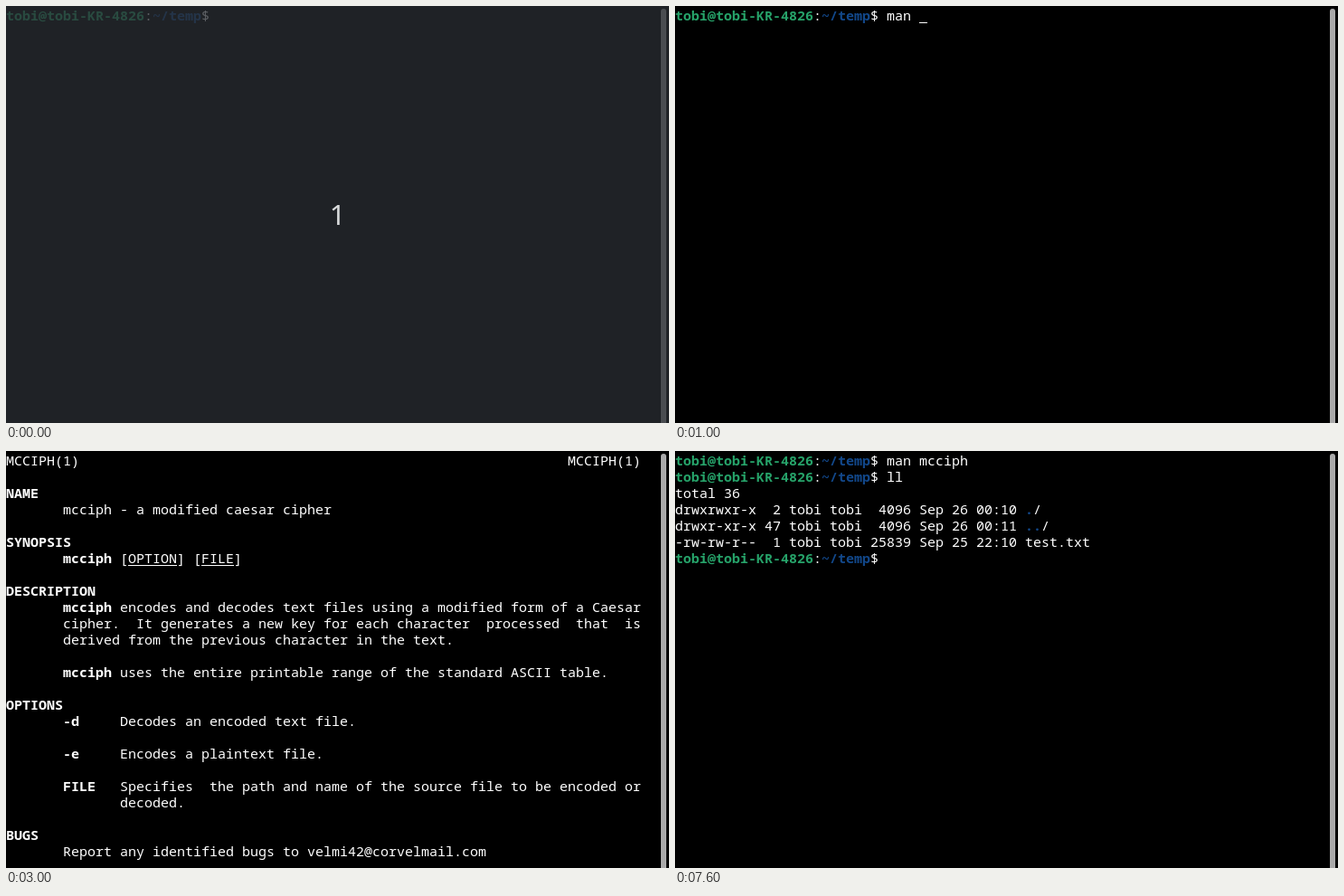
Recreate the animation shown at these times as an HTML page. Size 733 by 461 pixels, loop 8 s.

```html
<!DOCTYPE html>
<html lang="en">
<head>
<meta charset="utf-8">
<title>Terminal</title>
<style>
html, body { margin: 0; width: 100%; height: 100%; overflow: hidden; background: #000; }
#stage { position: relative; width: 733px; height: 461px; overflow: hidden; }
#stage > * { position: absolute; }
pre { left: 0; top: 1px; margin: 0; color: #fff; font: 15px/18px "Noto Sans Mono", monospace; }
u { text-decoration-thickness: 1px; text-underline-offset: 2px; text-decoration-skip-ink: none; }
.user { color: #26a269; }
.path { color: #12488b; }
#cursor { width: 9px; height: 1px; background: #fff; }
#bar { left: 724px; top: 3px; width: 6px; height: 460px; border-radius: 3px; background: #aaa; }
#count { inset: 0; background: rgba(42, 46, 51, .75); color: #d8dadb; text-align: center;
  font: 31px/461px "Noto Sans", sans-serif; }
</style>
</head>
<body>
<div id="stage">
  <pre id="screen"></pre>
  <div id="cursor"></div>
  <div id="bar"></div>
  <div id="count">1</div>
</div>
<script>
const [screen, cursor, count] = ['screen', 'cursor', 'count'].map(id => document.getElementById(id));
const LOOP = 8000, CELL = 9, ROW = 18, PROMPT_COLS = 26;

const prompt = '<b class="user">tobi@tobi-KR-4826</b>:<b class="path">~/temp</b>$ ';
const first = { text: 'man mcciph', keys: [500, 600, 800, 1000, 1500, 1600, 1800, 1900, 2000, 2600] };
const second = { text: 'll', keys: [6700, 6900] };
const cursorOn = [[500, 3000], [5800, 6300], [6600, 7600]];

const listing = `total 36
drwxrwxr-x  2 tobi tobi  4096 Sep 26 00:10 <b class="path">.</b>/
drwxr-xr-x 47 tobi tobi  4096 Sep 26 00:11 <b class="path">..</b>/
-rw-rw-r--  1 tobi tobi 25839 Sep 25 22:10 test.txt
`;

const manual = `MCCIPH(1)${' '.repeat(60)}MCCIPH(1)

<b>NAME</b>
       mcciph - a modified caesar cipher

<b>SYNOPSIS</b>
       <b>mcciph</b> [<u>OPTION</u>] [<u>FILE</u>]

<b>DESCRIPTION</b>
       <b>mcciph</b> encodes and decodes text files using a modified form of a Caesar
       cipher.  It generates a new key for each character  processed  that  is
       derived from the previous character in the text.

       <b>mcciph</b> uses the entire printable range of the standard ASCII table.

<b>OPTIONS</b>
       <b>-d</b>     Decodes an encoded text file.

       <b>-e</b>     Encodes a plaintext file.

       <b>FILE</b>   Specifies  the path and name of the source file to be encoded or
              decoded.

<b>BUGS</b>
       Report any identified bugs to velmi42@corvelmail.com`;

const typed = (cmd, t) => cmd.text.slice(0, cmd.keys.filter(k => k <= t).length);

function view(t) {
  if (t >= 3000 && t < 5800) return { html: manual, row: 0, col: 0 };
  const a = typed(first, t), b = typed(second, t);
  let html = prompt + a, row = 0, input = a;
  if (t >= 5800) {
    html += '\n' + prompt + b;
    row = 1;
    input = b;
  }
  if (t >= 7200) {
    html += '\n' + listing + prompt;
    row = 6;
    input = '';
  }
  return { html, row, col: PROMPT_COLS + input.length };
}

let shown = '';
function draw(t) {
  const { html, row, col } = view(t);
  if (html !== shown) screen.innerHTML = shown = html;
  cursor.style.left = col * CELL + 'px';
  cursor.style.top = (row + 1) * ROW + 'px';
  cursor.hidden = !cursorOn.some(([from, to]) => t >= from && t < to);
  count.hidden = t >= 100;
}

const start = performance.now();
function tick() {
  draw((performance.now() - start) % LOOP);
  requestAnimationFrame(tick);
}
tick();
</script>
</body>
</html>
```
